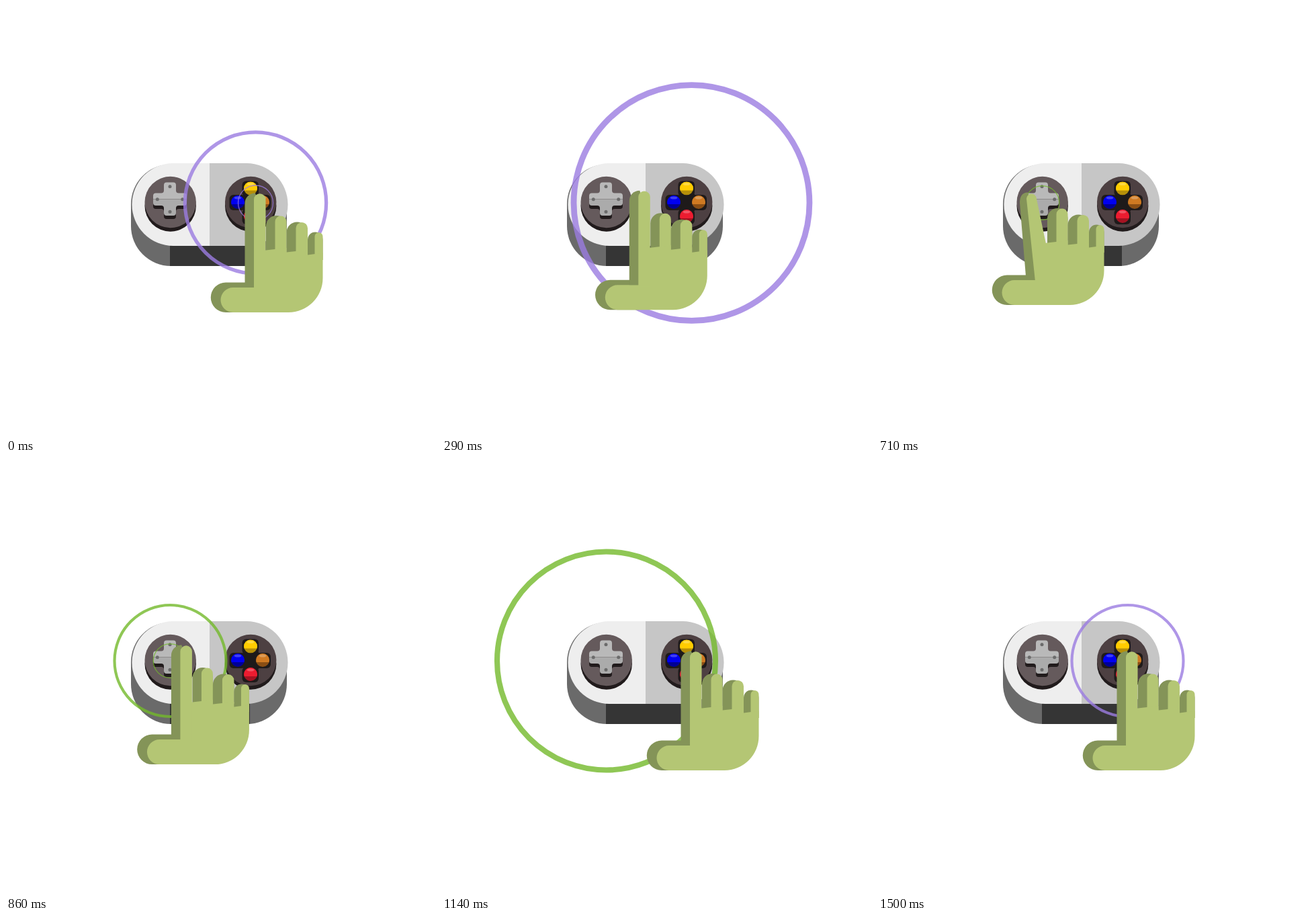
These frames come from a looping animation (640x640 px, 1.57 s). An HTML page:

```html
<!DOCTYPE html>
<html lang="en">
<head>
<meta charset="utf-8">
<title>Gamepad tap</title>
<style>
  html, body { margin: 0; width: 100%; height: 100%; overflow: hidden; background: #fff; }
  svg { display: block; width: 100vw; height: 100vh; }
  .ring { fill: none; opacity: .8; }
  .dark { fill: #849458; }
  .light { fill: #b4c674; }
</style>
</head>
<body>
<svg viewBox="0 0 640 640">
  <defs>
    <clipPath id="body"><rect x="186" y="235.5" width="232" height="151.5" rx="59.5"/></clipPath>
    <clipPath id="top"><rect x="187.5" y="234" width="232" height="123" rx="61.5"/></clipPath>
    <path id="cross" d="M239 262.5h10q4 0 4 4v8q0 4 4 4h8q4 0 4 4v10.500q0 4-4 4h-8q-4 0-4 4v7q0 4-4 4h-10q-4 0-4-4v-7q0-4-4-4h-8q-4 0-4-4v-10.500q0-4 4-4h8q4 0 4-4v-8q0-4 4-4z"/>
    <clipPath id="crossClip"><use href="#cross"/></clipPath>
    <clipPath id="ball"><circle r="10"/></clipPath>
  </defs>

  <g clip-path="url(#body)">
    <rect x="180" y="230" width="245" height="160" fill="#6a6a6a"/>
    <rect x="244" y="300" width="119" height="90" fill="#353535"/>
  </g>
  <g clip-path="url(#top)">
    <rect x="187" y="234" width="116" height="123" fill="#eee"/>
    <rect x="303" y="234" width="117" height="123" fill="#c6c6c6"/>
  </g>

  <circle cx="244.700" cy="297.500" r="38.200" fill="#211b1c"/>
  <circle cx="244.700" cy="292" r="38.200" fill="#655a5c"/>
  <use href="#cross" y="5" fill="#211b1c"/>
  <g clip-path="url(#crossClip)">
    <rect x="215" y="260" width="60" height="27.500" fill="#b9b9b9"/>
    <rect x="215" y="287.500" width="60" height="30" fill="#ababab"/>
  </g>
  <g fill="#6b6b6b">
    <circle cx="244" cy="268.800" r="2.500"/><circle cx="225.300" cy="287.700" r="2.500"/>
    <circle cx="262.700" cy="287.700" r="2.500"/><circle cx="244" cy="306.300" r="2.500"/>
  </g>

  <circle cx="364.200" cy="297.500" r="38.200" fill="#211b1c"/>
  <circle cx="364.200" cy="292" r="38.200" fill="#4d4042"/>
  <g id="buttons"><rect x="353" y="280" width="23" height="25" fill="#1e1a1a"/></g>

  <g id="rings"></g>
  <g id="hand">
    <path class="dark" d="M370 411.500H327a22.250 22.250 0 0 0 0 44.500h43z"/>
    <g id="fingers"></g>
    <path class="light" d="M369 419H338a18.500 18.500 0 0 0 0 37H420.500a51 51 0 0 0 51-51V367.500L449 370.500V363L417.500 366.500V360L387 363.500L369 366z"/>
    <path class="dark" id="indexDark"/>
    <path class="light" id="indexLight"/>
  </g>
</svg>
<script>
const FPS = 14, FRAMES = 22, LOOP = 1570;
const WRAP = 21.54; // frames after which the rings carry on in the next round
const $ = id => document.getElementById(id);

function add(parent, tag, attrs) {
  const el = document.createElementNS('http://www.w3.org/2000/svg', tag);
  for (const name in attrs) el.setAttribute(name, attrs[name]);
  return parent.appendChild(el);
}

// Linear interpolation through [time, value] pairs
function mix(keys, t) {
  if (t <= keys[0][0]) return keys[0][1];
  for (let i = 1; i < keys.length; i++) {
    const [t0, v0] = keys[i - 1], [t1, v1] = keys[i];
    if (t <= t1) return v0 + (v1 - v0) * (t - t0) / (t1 - t0);
  }
  return keys[keys.length - 1][1];
}

function ease(from, to, t) {
  const u = Math.min(1, Math.max(0, (t - from) / (to - from)));
  return (1 - Math.cos(Math.PI * u)) / 2;
}

function button(x, y, top, bottom) {
  const g = add($('buttons'), 'g', { transform: `translate(${x} ${y})` });
  add(g, 'rect', { x: -12.5, y: -11, width: 24.5, height: 23, rx: 6, fill: '#1e1a1a' });
  const ball = add(g, 'g', { 'clip-path': 'url(#ball)' });
  add(ball, 'rect', { x: -10, y: -10, width: 20, height: 20, fill: bottom });
  add(ball, 'rect', { x: -10, y: -10, width: 20, height: 13, fill: top });
  add(ball, 'ellipse', { cy: -6.5, rx: 5.5, ry: 2, fill: '#fff', opacity: .25 });
}
button(364, 271.5, '#ffcc00', '#b58f0a');
button(345, 292, '#0000f0', '#000096');
button(382, 292, '#cf7a22', '#8a4e14');
button(364, 313, '#ec1c30', '#a51322');

function finger(x, inner, right, top, bottom) {
  const g = $('fingers'), r = (right - x) / 2, s = (right - inner) / 2;
  add(g, 'path', { class: 'dark', d: `M${x} ${bottom}V${top + r}a${r} ${r} 0 0 1 ${2 * r} 0V${bottom}z` });
  add(g, 'path', { class: 'light', d: `M${inner} ${bottom}V${top + s + .5}a${s} ${s} 0 0 1 ${2 * s} 0V${bottom}z` });
}
finger(387, 400.5, 417.5, 312, 372);
finger(417.5, 431.5, 449, 321.5, 374);
finger(449, 459.5, 471.5, 336.5, 378);

const GREEN = { x: 244.5, color: '#74b92b' };
const PURPLE = { x: 371.5, color: '#9c7ce2' };
const RADIUS = [[0, 25.3], [.5, 26], [1, 43], [2, 83], [3, 124], [4, 162.5], [4.5, 175.7], [5, 186]];
const rings = [[GREEN, 10], [GREEN, 12], [PURPLE, 19], [PURPLE, 21.05]].map(([kind, start]) => ({
  start,
  el: add($('rings'), 'circle', { class: 'ring', cx: kind.x, cy: 293, stroke: kind.color })
}));

function drawRing({ el, start }, step) {
  const age = step < start ? step - start + WRAP : step - start;
  const r = mix(RADIUS, age);
  el.setAttribute('visibility', age < 6 ? 'visible' : 'hidden');
  el.setAttribute('r', r);
  el.setAttribute('stroke-width', r * .05);
}

function drawIndex(tilt) {
  const a = 355.5 + 9.5 * tilt, b = 13 * tilt, right = 386.5 + 15.5 * tilt;
  const d = 10 * Math.abs(tilt), left = 369 + b, r = (right - left) / 2;
  $('indexDark').setAttribute('d',
    `M355.5 419L${a} ${294 + d}C${a} ${285 + d} ${362 + b} ${278.5 + d} ${371 + b} ${278.5 + d}L${378 + b} ${300 + d}L378 419z`);
  $('indexLight').setAttribute('d',
    `M369 421L${left} ${288 + d}A${r} ${r} 0 0 1 ${right} ${288 + d}L386.5 372V421z`);
}

const TILT = [[6, 0], [7, -.5], [8, -1], [10, -1], [11, -.5], [12, 0], [16, 0], [17, 1], [19, 1], [20, .5], [21, 0]];
const NUDGE = [[16, 0], [17, 5], [19, 5], [20, 2.5], [21, 0]];

function draw(step) {
  const out = ease(.7, 6.77, step), back = ease(10.8, 15, step);
  const x = 135 * (back - out) + mix(NUDGE, step);
  const y = -11 * (Math.pow(out, 1.9) - back);
  $('hand').setAttribute('transform', `translate(${x} ${y})`);
  drawIndex(mix(TILT, step));
  rings.forEach(ring => drawRing(ring, step));
}

const startOf = step => Math.round(step * 100 / FPS) * 10;
const origin = performance.now();
let shown = -1;

function tick() {
  const t = (performance.now() - origin) % LOOP;
  let step = FRAMES - 1;
  while (startOf(step) > t) step--;
  if (step !== shown) draw(shown = step);
  requestAnimationFrame(tick);
}
tick();
</script>
</body>
</html>
```
